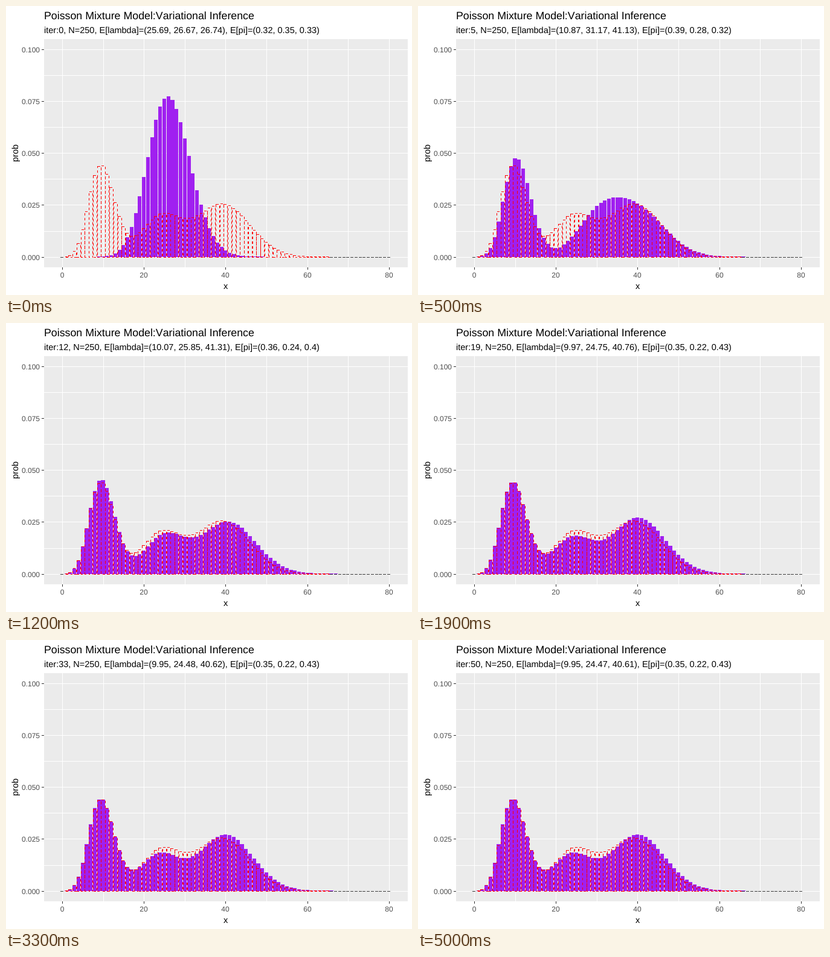
Write an HTML page that moves like this. It is 672 px wide and 480 px high and loops after 5.1 s.

```html
<!DOCTYPE html>
<html lang="en">
<head>
<meta charset="utf-8">
<title>Poisson mixture</title>
<style>
  html, body { margin: 0; width: 100%; height: 100%; overflow: hidden; background: #fff; }
  svg { display: block; font-family: "Liberation Sans", Arial, sans-serif; }
  text { font-kerning: none; text-rendering: geometricPrecision; }
  .tick { font-size: 12px; fill: #4d4d4d; }
  .label { font-size: 14.5px; }
  path { shape-rendering: crispEdges; fill: none; }
</style>
</head>
<body>
<svg id="stage" width="672" height="480" viewBox="0 0 672 480">
  <path d="M63 55H665V434H63Z" style="fill:#ebebeb"/>
  <path id="grid" stroke="#fff"/>
  <path id="bars" style="fill:#a020f0"/>
  <path id="outline" stroke="#f00" stroke-dasharray="4 4"/>
  <path id="flat" stroke="#404040"/>
  <path id="ticks" stroke="#333"/>
  <text x="63" y="22" font-size="17.8">Poisson Mixture Model:Variational Inference</text>
  <text id="sub" class="label" x="63" y="45"></text>
  <text class="label" x="363.6" y="470" text-anchor="middle">x</text>
  <text class="label" transform="translate(19.5 244.5) rotate(-90)" text-anchor="middle">prob</text>
</svg>
<script>
const STEP = 100, STEPS = 51, MAX_X = 80, SETTLED = 36;
const $ = id => document.getElementById(id);
const px = x => Math.round(92.9 + 6.763 * x);
const py = p => Math.round(416.58 - 3445 * p);
const xs = Array.from({ length: MAX_X + 1 }, (_, x) => x);

// Known states: iteration, three rates, three weights
const keys = [
  [0, 25.69, 26.67, 26.74, .32, .35, .33],
  [5, 10.87, 31.17, 41.13, .3925, .2825, .3245],
  [12, 10.07, 25.85, 41.31, .36, .24, .4],
  [19, 9.97, 24.75, 40.76, .35, .22, .43],
  [27, 9.95, 24.51, 40.63, .35, .22, .43],
  [33, 9.95, 24.48, 40.62, .35, .22, .43],
  [SETTLED, 9.95, 24.47, 40.61, .35, .22, .43]
].map(([at, ...state]) => ({ at, state }));

const logFact = [0];
for (let x = 1; x <= MAX_X; x++) logFact[x] = logFact[x - 1] + Math.log(x);
const pois = (x, rate) => Math.exp(x * Math.log(rate) - rate - logFact[x]);
const parts = (s, x) => [0, 1, 2].map(k => s[k + 3] * pois(x, s[k]));
const density = (s, x) => parts(s, x).reduce((a, b) => a + b);

// One expectation-maximisation step towards the settled mixture
const goal = keys[keys.length - 1].state;
function improve(s) {
  const mass = [0, 0, 0], sum = [0, 0, 0];
  for (const x of xs) {
    const p = parts(s, x), total = p[0] + p[1] + p[2], w = density(goal, x);
    p.forEach((v, k) => {
      const share = w * v / total;
      mass[k] += share;
      sum[k] += share * x;
    });
  }
  return [...sum.map((v, k) => v / mass[k]), ...mass];
}

const fit = [keys[0].state];
for (let i = 1; i <= SETTLED; i++) fit[i] = improve(fit[i - 1]);

// Spread the remaining error at the known states over the steps between them
function stateAt(i) {
  i = Math.min(i, SETTLED);
  const n = Math.max(1, keys.findIndex(k => k.at >= i));
  const a = keys[n - 1], b = keys[n], u = (i - a.at) / (b.at - a.at);
  return fit[i].map((v, j) =>
    v + (1 - u) * (a.state[j] - fit[a.at][j]) + u * (b.state[j] - fit[b.at][j]));
}

function box(x, p, shift) {
  const l = px(x - .45), r = px(x + .45), top = py(p), h = py(0) - top;
  return `M${l + shift} ${top + shift}h${r - l}v${h}h${l - r}z`;
}

function addTick(x, y, anchor, str) {
  const el = document.createElementNS("http://www.w3.org/2000/svg", "text");
  el.setAttribute("class", "tick");
  el.setAttribute("x", x);
  el.setAttribute("y", y);
  el.setAttribute("text-anchor", anchor);
  el.textContent = str;
  $("stage").append(el);
}

function drawFixed() {
  let grid = "", ticks = "", outline = "", flat = "";
  for (let i = 0; i <= 8; i++) {
    const x = px(i * 10) + .5, y = py(i * .0125) + .5;
    grid += `M${x} 55V434M63 ${y}H665`;
    if (i % 2) continue;
    ticks += `M${x} 434v4M59 ${y}h4`;
    addTick(x - .5, 451, "middle", i * 10);
    addTick(56, y + 4, "end", (i * .0125).toFixed(3));
  }
  const truth = [10, 25, 40, .35, .25, .4];
  for (const x of xs) {
    const p = density(truth, x);
    if (py(p) < py(0)) outline += box(x, p, .5);
    else flat += `M${px(x - .45)} ${py(0) + .5}h5`;
  }
  $("grid").setAttribute("d", grid);
  $("ticks").setAttribute("d", ticks);
  $("outline").setAttribute("d", outline);
  $("flat").setAttribute("d", flat);
}

const list = values => "(" + values.map(v => +v.toFixed(2)).join(", ") + ")";

function draw(i) {
  const s = stateAt(i);
  $("bars").setAttribute("d", xs.map(x => box(x, density(s, x), 0)).join(""));
  $("sub").textContent =
    `iter:${i}, N=250, E[lambda]=${list(s.slice(0, 3))}, E[pi]=${list(s.slice(3))}`;
}

let shown = -1;
function tick() {
  const i = Math.floor(performance.now() / STEP) % STEPS;
  if (i !== shown) draw(shown = i);
  requestAnimationFrame(tick);
}

drawFixed();
tick();
</script>
</body>
</html>
```
